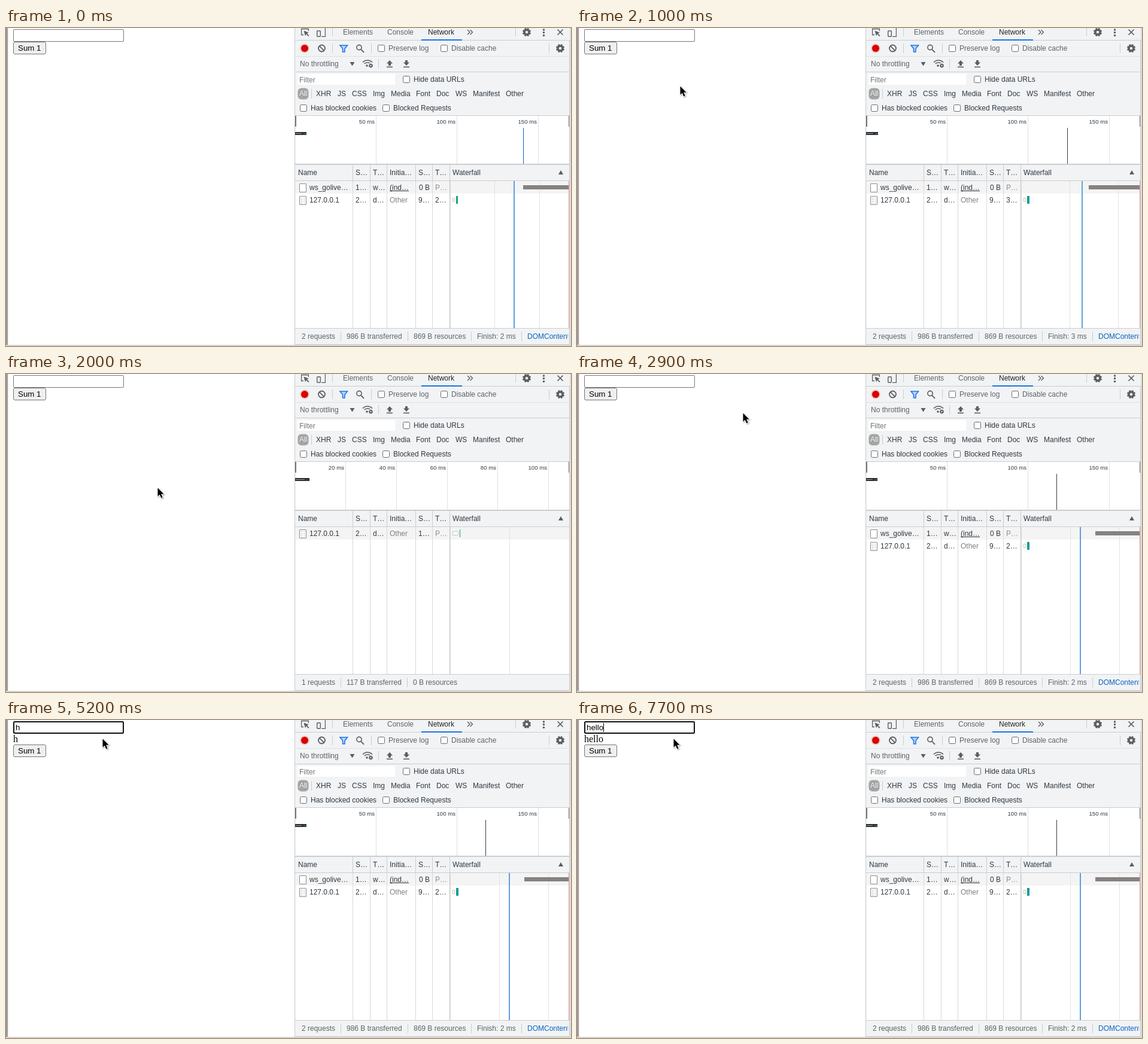
An HTML page with a canvas for the animation above (8 s loop, 944 by 532 pixels).

```html
<!DOCTYPE html>
<html lang="en">
<head>
<meta charset="utf-8">
<title>Input binding with network panel</title>
<style>
html, body { margin: 0; width: 100%; height: 100%; overflow: hidden; background: #fff; }
canvas { display: block; }
</style>
</head>
<body>
<canvas id="stage" width="944" height="532"></canvas>
<script>
const ctx = document.getElementById('stage').getContext('2d');
const LOOP = 8000;
const UI = '12px "Liberation Sans", sans-serif';
const SMALL = '9.6px "Liberation Sans", sans-serif';
const FORM = '13.333px "Liberation Sans", sans-serif';
const SERIF = '16px "Liberation Serif", serif';
const MENU = '14.667px "Noto Sans", sans-serif';
const GREY = '#5f6368', INK = '#303942', LINE = '#cacdd1', PANEL = '#f1f3f4', ICON = '#5a5e62';

// Network panel contents for each page load
const firstLoad = { ticks: [618, 753, 889], step: 50, mark: 864, markColor: '#0b62c4', mini: 19,
  grid: [816, 891], blue: 848, blueColor: '#5f9be3', bar: 864, ms: 2 };
const secondLoad = { ticks: [618, 753, 889], step: 50, mark: 819, markColor: '#3c3c3c', mini: 20,
  grid: [823, 904], blue: 843, blueColor: '#5ca6d9', bar: 855, ms: 3 };
const thirdLoad = { ticks: [618, 753, 889], step: 50, mark: 801, markColor: '#3c3c3c', mini: 19,
  grid: [824, 906], blue: 840, blueColor: '#5f9be3', bar: 866, ms: 2 };
const pending = { ticks: [567, 652, 737, 821, 906], step: 20, mini: 24, grid: [841], waiting: true };

// Each entry holds from its time until the next one
const loads = [[0, firstLoad], [300, pending], [500, secondLoad], [2000, pending], [2200, thirdLoad]];
const pageShown = [[0, true], [400, false], [500, true], [2100, false], [2200, true]];
const typed = [[0, ''], [4600, 'h'], [5700, ''], [6500, 'h'], [7200, 'he'], [7400, 'hel'], [7500, 'hell'], [7600, 'hello']];
const echoed = [[0, ''], [4700, 'h'], [5800, ''], [6600, 'h'], [7300, 'he'], [7500, 'hel'], [7600, 'hell'], [7700, 'hello']];
const caretOn = [[0, false], [4200, true], [5200, false], [5600, true], [6400, false], [6500, true], [7100, false], [7200, true]];
const path = [[700, 118, 4], [900, 164, 78], [1100, 179, 115], [1200, 190, 127], [1400, 224, 152],
  [1600, 243, 194], [1700, 249, 202], [1800, 253, 190], [2000, 253, 190], [2400, 320, 108], [2600, 320, 108],
  [3000, 262, 50], [3300, 199, 27], [3500, 207, 10], [3700, 170, 13], [4000, 149, 15], [4400, 149, 15],
  [4500, 152, 20], [4700, 157, 26], [4800, 157, 26], [5000, 161, 31]];

function valueAt(list, t) {
  let v = list[0][1];
  for (const [at, val] of list) if (t >= at) v = val;
  return v;
}

function pointerAt(t) {
  if (t < path[0][0]) return null;
  for (let i = 1; i < path.length; i++) {
    const [t0, x0, y0] = path[i - 1], [t1, x1, y1] = path[i];
    if (t < t1) {
      const k = (t - t0) / (t1 - t0);
      return { x: Math.round(x0 + (x1 - x0) * k), y: Math.round(y0 + (y1 - y0) * k) };
    }
  }
  const [, x, y] = path[path.length - 1];
  return { x, y };
}

function rect(x, y, w, h, color) {
  ctx.fillStyle = color;
  ctx.fillRect(x, y, w, h);
}

function text(s, x, y, color = INK, font = UI, align = 'left') {
  ctx.font = font;
  ctx.fillStyle = color;
  ctx.textAlign = align;
  ctx.fillText(s, x, y);
}

function box(x, y, w, h, r, fill, stroke, lw = 1) {
  ctx.beginPath();
  ctx.roundRect(x + lw / 2, y + lw / 2, w - lw, h - lw, r);
  if (fill) { ctx.fillStyle = fill; ctx.fill(); }
  if (stroke) { ctx.strokeStyle = stroke; ctx.lineWidth = lw; ctx.stroke(); }
}

function disc(x, y, r, color) {
  ctx.beginPath();
  ctx.arc(x, y, r, 0, Math.PI * 2);
  ctx.fillStyle = color;
  ctx.fill();
}

function ring(x, y, r, color, lw, from = 0, to = Math.PI * 2) {
  ctx.beginPath();
  ctx.arc(x, y, r, from, to);
  ctx.strokeStyle = color;
  ctx.lineWidth = lw;
  ctx.stroke();
}

// Flat list of x, y pairs
function trace(points) {
  ctx.beginPath();
  for (let i = 0; i < points.length; i += 2) ctx.lineTo(points[i], points[i + 1]);
}

function shape(color, ...points) {
  trace(points);
  ctx.closePath();
  ctx.fillStyle = color;
  ctx.fill();
}

function line(color, lw, ...points) {
  trace(points);
  ctx.strokeStyle = color;
  ctx.lineWidth = lw;
  ctx.stroke();
}

function check(x, y, label) {
  box(x, y, 12, 12, 2, '#fff', '#6b6b6b');
  text(label, x + 18, y + 10, INK);
}

function gear(x, y, size = 1) {
  for (let i = 0; i < 8; i++) {
    const a = i * Math.PI / 4 + Math.PI / 8, c = Math.cos(a), s = Math.sin(a);
    line(ICON, 3 * size, x + 3 * c * size, y + 3 * s * size, x + 7 * c * size, y + 7 * s * size);
  }
  ring(x, y, 4 * size, ICON, 3.4 * size);
}

function drawFrame() {
  rect(0, 0, 944, 532, '#fff');
  rect(0, 0, 4, 532, '#dcd9d6');
  rect(1, 0, 1, 532, '#48454a');
  rect(0, 530, 944, 2, '#dad6d2');
  rect(482, 0, 462, 530, PANEL);
  rect(482, 0, 1, 530, LINE);
}

function drawPage(t, pointer) {
  if (!valueAt(pageShown, t)) return;
  const value = valueAt(typed, t), echo = valueAt(echoed, t);
  const hover = pointer && pointer.x >= 12 && pointer.x < 197 && pointer.y >= 2 && pointer.y < 23;
  if (t >= 4200) box(12, 2, 185, 21, 1.5, '#fff', '#101010', 2);
  else box(12, 2, 185, 21, 1.5, '#fff', hover ? '#4f4f4f' : '#767676');
  text(value, 16, 17, '#000', FORM);
  if (valueAt(caretOn, t)) rect(16 + Math.floor(ctx.measureText(value).width), 5, 1, 15, '#000');
  text(echo, 12, 37, '#000', SERIF);
  const y = echo ? 41 : 23;
  box(12, y, 55, 21, 2.5, '#efefef', '#767676');
  text('Sum 1', 20, y + 15, '#000', FORM);
}

function drawTabs() {
  rect(483, 20, 459, 1, LINE);
  line(ICON, 1.3, 497, 11.5, 493.6, 11.5, 493.6, 1.5, 505.4, 1.5, 505.4, 5);
  shape(ICON, 497.5, 4.5, 506, 7.7, 502.8, 9, 506.5, 12.7, 505.2, 14, 501.5, 10.3, 500, 13.5);
  line(ICON, 1.2, 522.5, -1, 533.4, -1, 533.4, 14.4, 527, 14.4);
  box(519, 4, 7, 11, 1, PANEL, ICON, 1.4);
  for (const x of [545, 851]) rect(x, 0, 1, 14, LINE);
  text('Elements', 563, 11, GREY);
  text('Console', 637, 11, GREY);
  text('Network', 705, 11, '#222');
  rect(694, 19, 68, 2, '#1a73e8');
  for (const x of [771, 775.5]) line(ICON, 1.4, x, 3, x + 4, 7, x, 11);
  gear(870, 7);
  for (const y of [3, 7.5, 12.5]) disc(898.5, y, 1.7, ICON);
  line(ICON, 1.7, 921.5, 2.5, 930.5, 11.5);
  line(ICON, 1.7, 930.5, 2.5, 921.5, 11.5);
}

function drawToolbar() {
  disc(499, 34, 7.8, '#f3c6c6');
  disc(499, 34, 6, '#d80000');
  ring(527.5, 34, 5.5, ICON, 1.8);
  line(ICON, 1.8, 523.6, 30.2, 531.4, 37.8);
  trace([558, 29, 570.5, 29, 566, 34.5, 566, 40, 562.5, 40, 562.5, 34.5]);
  ctx.closePath();
  ctx.fillStyle = '#b9d3f8';
  ctx.fill();
  ctx.strokeStyle = '#1a73e8';
  ctx.lineWidth = 1.5;
  ctx.stroke();
  ring(590, 32.5, 4.1, ICON, 1.6);
  line(ICON, 1.9, 593, 35.6, 598, 40.8);
  for (const x of [545, 610, 907]) rect(x, 26, 1, 16, LINE);
  check(621, 28, '');
  text('Preserve log', 639, 38, GREY);
  check(726, 28, '');
  text('Disable cache', 744, 38, GREY);
  gear(926, 34);

  rect(483, 47, 459, 1, '#dfe1e4');
  text('No throttling', 491, 64, GREY);
  shape(ICON, 574.5, 57, 582.5, 57, 578.5, 63.5);
  for (const r of [11, 7.3]) ring(604, 65, r, ICON, 1.6, -Math.PI * .76, -Math.PI * .24);
  disc(603, 63, 1.8, ICON);
  disc(609.5, 63, 4.5, PANEL);
  gear(609.5, 63, .5);
  rect(622, 52, 1, 16, LINE);
  shape(ICON, 641, 54, 646, 59.5, 643, 59.5, 643, 63, 639, 63, 639, 59.5, 636, 59.5);
  shape(ICON, 669, 63, 674, 57.5, 671, 57.5, 671, 54, 667, 54, 667, 57.5, 664, 57.5);
  for (const x of [636, 664]) rect(x, 64.5, 10, 1.6, ICON);
  rect(483, 73, 459, 1, LINE);
}

function drawFilters() {
  rect(487, 77, 163, 18, '#fff');
  text('Filter', 490, 91, '#757575');
  check(663, 80, 'Hide data URLs');
  box(487, 100, 19, 20, 6, '#a5a5a5');
  text('All', 490, 115, '#777');
  text('All', 490, 114, '#fff');
  rect(510, 102, 1, 16, LINE);
  const types = { XHR: 518, JS: 554, CSS: 578, Img: 613, Media: 643, Font: 685, Doc: 719, WS: 751, Manifest: 780, Other: 835 };
  for (const name in types) text(name, types[name], 114);
  check(491, 128, 'Has blocked cookies');
  check(629, 128, 'Blocked Requests');
  rect(483, 146, 459, 1, LINE);
}

function drawOverview(n) {
  rect(484, 147, 457, 80, '#fff');
  n.ticks.forEach((x, i) => {
    rect(x, 147, 1, 80, '#e0e0e0');
    text((i + 1) * n.step + ' ms', x - 2, 160, INK, SMALL, 'right');
  });
  rect(483, 147, 2, 18, '#757575');
  rect(940, 147, 2, 18, '#757575');
  rect(483, 174, n.mini, 5, '#2c2c2e');
  rect(484, 176, n.mini - 9, 1, '#a0a0a0');
  rect(478 + n.mini, 176, 1, 2, '#0a9d58');
  if (!n.waiting) rect(480 + n.mini, 176, 2, 2, '#1a8ba8');
  if (n.mark) rect(n.mark, 167, 1, 60, n.markColor);
  rect(483, 227, 459, 2, LINE);
}

function fileIcon(y, lined) {
  box(490, y, 12, 15, .5, '#fff', '#8b8b8b');
  if (lined) for (let i = 0; i < 4; i++) {
    rect(492, y + 3 + i * 3, 4, 1, '#c9c9c9');
    rect(497, y + 3 + i * 3, 3, 1, '#d6d6d6');
  }
}

function drawTable(n) {
  rect(484, 256, 457, 246, '#fff');
  rect(484, 256, 457, 21, '#f4f4f4');
  for (const x of n.grid) rect(x, 256, 1, 246, '#e3e3e3');
  for (const x of [579, 608, 636, 684, 712, 741]) {
    rect(x, 229, 1, 26, LINE);
    rect(x, 256, 1, 246, x === 741 ? '#c2c4c6' : '#d8d8d8');
  }
  rect(742, 256, 1, 246, '#e3e3e3');
  const heads = [['Name', 488], ['S…', 584], ['T…', 613], ['Initia…', 641], ['S…', 689], ['T…', 717], ['Waterfall', 746]];
  for (const [s, x] of heads) text(s, x, 246);
  shape(ICON, 923, 245, 931, 245, 927, 238);
  rect(483, 255, 459, 1, LINE);

  const y = n.waiting ? 0 : 21;
  fileIcon(260 + y, true);
  text('127.0.0.1', 507, 271 + y);
  text('2…', 584, 271 + y);
  text('d…', 613, 271 + y);
  text('Other', 641, 271 + y, '#808080');
  text(n.waiting ? '1…' : '9…', 689, 271 + y);
  if (n.waiting) {
    text('P…', 717, 271, '#909090');
    box(746, 263, 10, 7, 0, '#fff', '#c8c8c8');
    rect(758, 260, 1, 13, '#12a85c');
    return;
  }
  text(n.ms + '…', 717, 292);
  box(746, 284, 4, 7, 0, '#fff', '#c8c8c8');
  rect(752, 281, 3, 13, '#12a85c');
  rect(n === firstLoad ? 752 : 754, 281, n === firstLoad ? 1 : 2, 13, '#1594c4');

  fileIcon(260, false);
  text('ws_golive…', 507, 271);
  text('1…', 584, 271);
  text('w…', 613, 271);
  text('(ind…', 641, 271);
  rect(641, 272, 32, 1, INK);
  text('0 B', 708, 271, INK, UI, 'right');
  text('P…', 717, 271, '#909090');
  rect(n.bar, 263, 941 - n.bar, 7, '#858282');
  rect(n.blue, 256, 2, 246, n.blueColor);
  rect(940, 256, 1, 246, '#e79a9a');
}

function drawStatus(n) {
  rect(483, 502, 459, 1, LINE);
  const parts = n.waiting
    ? [['1 requests', 494], ['117 B transferred', 569], ['0 B resources', 680]]
    : [['2 requests', 494], ['986 B transferred', 569], ['869 B resources', 681], [`Finish: ${n.ms} ms`, 787], ['DOMContentLoaded', 871]];
  ctx.save();
  ctx.beginPath();
  ctx.rect(484, 503, 455, 26);
  ctx.clip();
  parts.forEach(([s, x], i) => {
    text(s, x, 520, i === 4 ? '#0b62c4' : GREY);
    if (i) rect(x - 10, 508, 1, 16, LINE);
  });
  ctx.restore();
  rect(483, 529, 459, 1, LINE);
  rect(941, 21, 1, 508, LINE);
  rect(942, 0, 2, 532, '#e0dcd8');
}

const menuItems = [
  ['Back', 140, 'Alt+Left Arrow'], ['Forward', 166, 'Alt+Right Arrow'], ['Reload', 192, 'Ctrl+R'],
  ['Save as…', 229, 'Ctrl+S'], ['Print…', 255, 'Ctrl+P'], ['Cast…', 281],
  ['Send to your devices', 318], ['Create QR code for this page', 344], ['Translate to español', 381],
  ['Fenmute — best ad blocker', 418], ['Braxpane', 444], ['Save To Nookle', 470],
  ['View page source', 507, 'Ctrl+U'], ['Inspect', 533, 'Ctrl+Shift+I']
];

function drawMenu(pointer) {
  ctx.save();
  ctx.shadowColor = 'rgba(0,0,0,.22)';
  ctx.shadowBlur = 4;
  rect(178, 123, 370, 420, '#b9b9b9');
  ctx.restore();
  rect(179, 124, 368, 420, '#fff');
  for (const y of [210, 299, 362, 399, 488]) rect(179, y, 368, 1, '#dcdcdc');
  for (const [label, y, keys] of menuItems) {
    const off = label === 'Forward';
    const hot = !off && pointer.y >= y - 13 && pointer.y < y + 13;
    if (hot) rect(179, y - 13, 368, 26, '#3584e4');
    text(label, 217, y + 6, hot ? '#fff' : off ? '#a9a9a9' : '#333', MENU);
    if (keys) text(keys, 524, y + 6, hot ? '#fff' : '#999', MENU, 'right');
  }
  for (const y of [318, 418, 444]) shape('#666', 535, y - 4, 540, y, 535, y + 4);
  line('#444', 1.4, 196, 322.5, 188.5, 322.5);
  line('#444', 1.4, 190.5, 321, 190.5, 314, 202, 314);
  box(197, 316, 6, 8, 1, '#fff', '#444', 1.4);
  for (const [x, y] of [[189, 338], [197, 338], [189, 346], [197, 346]]) {
    box(x, y, 6, 6, 0, null, '#333', 1.6);
  }
  disc(196, 418, 8, '#e01b24');
  disc(196, 444, 7.5, '#7d9fc6');
  box(188, 463, 16, 15, 2, '#ee4056');
}

function drawArrow({ x, y }) {
  const tip = [0, 0, 0, 14.2, 3.3, 11.2, 5.8, 17, 8.2, 16, 5.7, 10.3, 10.2, 10.3];
  ctx.save();
  ctx.translate(x + .5, y + .5);
  ctx.lineJoin = 'round';
  ctx.shadowColor = 'rgba(0,0,0,.35)';
  ctx.shadowBlur = 2;
  ctx.shadowOffsetX = ctx.shadowOffsetY = 1;
  trace(tip);
  ctx.closePath();
  ctx.strokeStyle = '#fff';
  ctx.lineWidth = 2;
  ctx.stroke();
  ctx.restore();
  ctx.save();
  ctx.translate(x + .5, y + .5);
  shape('#000', ...tip);
  ctx.restore();
}

function drawBeam({ x, y }) {
  for (const [color, lw] of [['#fff', 3], ['#222', 1.2]]) {
    line(color, lw, x + .5, y - 7, x + .5, y + 7);
    for (const dy of [-7.5, 7.5]) line(color, lw, x - 2.5, y + dy, x + 3.5, y + dy);
  }
}

function draw(t) {
  const pointer = pointerAt(t);
  const net = valueAt(loads, t);
  drawFrame();
  drawPage(t, pointer);
  drawTabs();
  drawToolbar();
  drawFilters();
  drawOverview(net);
  drawTable(net);
  drawStatus(net);
  if (t >= 1100 && t < 2000) drawMenu(pointer);
  if (!pointer) return;
  const overInput = t >= 3600 && pointer.x < 197 && pointer.y < 23;
  (overInput ? drawBeam : drawArrow)(pointer);
}

function tick() {
  const t = performance.now() % LOOP;
  draw(Math.floor(t / 100) * 100);
  requestAnimationFrame(tick);
}
tick();
</script>
</body>
</html>
```
